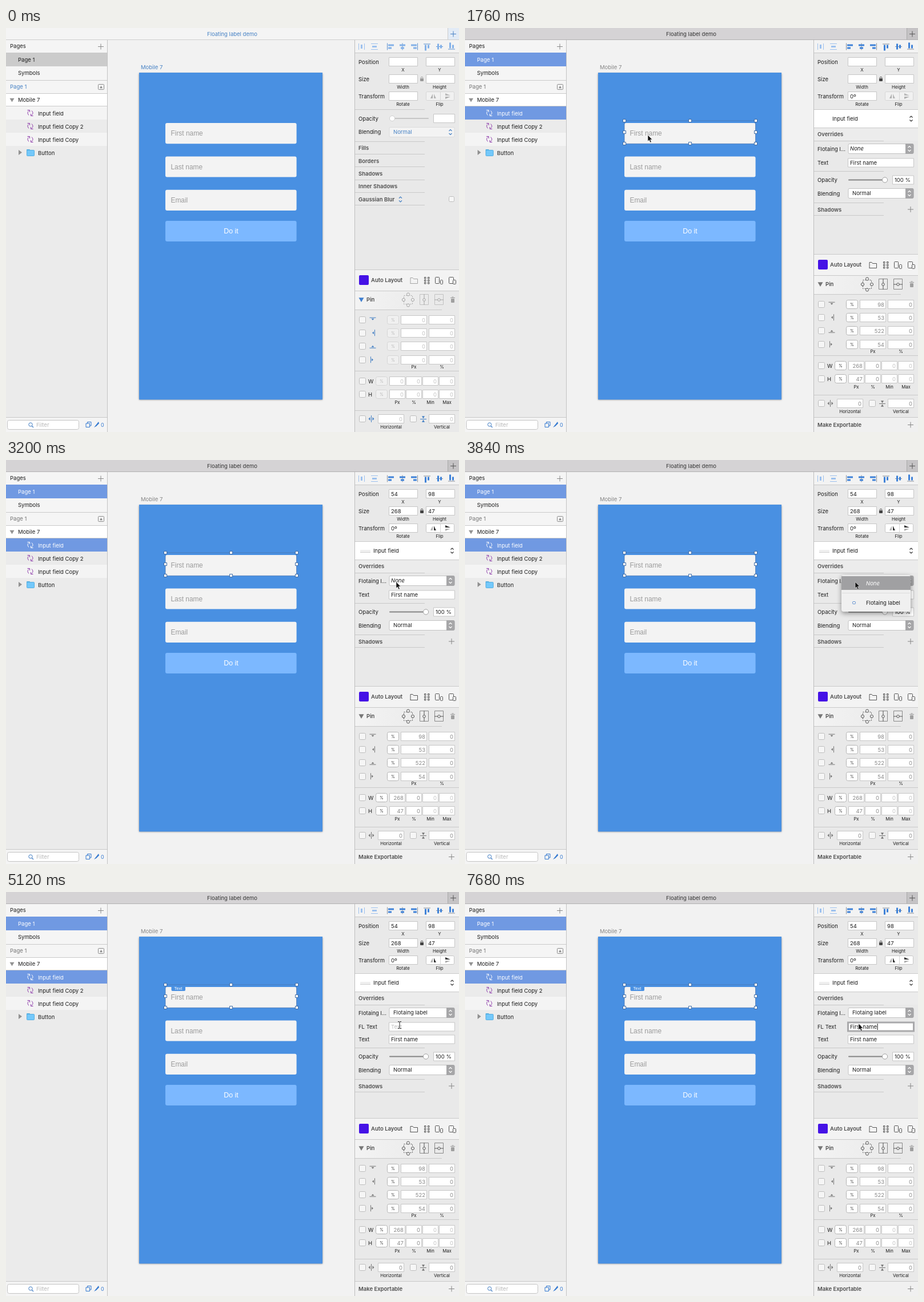
An HTML page with a canvas for the animation above (8000 ms loop, 793x706 px).

```html
<!DOCTYPE html>
<html lang="en">
<head>
<meta charset="utf-8">
<title>Floating label demo</title>
<style>
html, body { margin: 0; width: 100%; height: 100%; overflow: hidden; background: #f2f2f2; }
canvas { display: block; width: 793px; height: 706px; }
</style>
</head>
<body>
<canvas id="stage" width="793" height="706"></canvas>
<script>
const c = document.getElementById('stage').getContext('2d');
const LOOP = 8000, STEP = 160;
const UI = 'Inter, "Open Sans", sans-serif', ART = '"Liberation Sans", sans-serif';
const BLUE = '#4990e2', LINK = '#4580c4', INK = '#1d1d1d', HEAD = '#4c4c4c', LINE = '#c9c9c9';

function box(x, y, w, h, fill) { c.fillStyle = fill; c.fillRect(x, y, w, h); }
function round(x, y, w, h, r, fill, stroke) {
  c.beginPath();
  c.roundRect(x, y, w, h, r);
  if (fill) { c.fillStyle = fill; c.fill(); }
  if (stroke) { c.strokeStyle = stroke; c.lineWidth = 1; c.stroke(); }
}
function path(points, { fill, stroke, width = 1 }) {
  c.beginPath();
  points.forEach(([x, y], i) => i ? c.lineTo(x, y) : c.moveTo(x, y));
  if (fill) { c.closePath(); c.fillStyle = fill; c.fill(); }
  if (stroke) { c.strokeStyle = stroke; c.lineWidth = width; c.stroke(); }
}
function ring(x, y, r, stroke, fill, from = 0, to = 7) {
  c.beginPath();
  c.arc(x, y, r, from, to);
  if (fill) { c.fillStyle = fill; c.fill(); }
  c.strokeStyle = stroke; c.lineWidth = 1; c.stroke();
}
function text(s, x, y, { size = 9.5, color = INK, style = '', font = UI, align = 'left' } = {}) {
  c.font = `${style} ${size}px ${font}`;
  c.fillStyle = color;
  c.textAlign = align;
  c.fillText(s, x, y + size * .36);
}
const small = (s, x, y) => text(s, x, y, { size: 7.8, align: 'center' });
const head = (s, x, y, color = HEAD) => text(s, x, y, { style: '600', color });
const rule = (y, to = 793, x = 611) => box(x, y, to - x, 1, LINE);

function field(x, y, w, value = '', color = INK, right) {
  round(x + .5, y - 7.5, w - 1, 15, 0, '#fff', '#c6c6c6');
  text(value, right ? x + w - 3 : x + 4, y + .5, { color, align: right ? 'right' : 'left' });
}
const check = (x, y) => round(x + .5, y - 5.5, 11, 11, 2, '#f6f6f6', '#bdbdbd');
function plus(x, y, color, r = 5) {
  box(x - r, y - .5, 2 * r, 1, color);
  box(x - .5, y - r, 1, 2 * r, color);
}
function chevrons(x, y, color) {
  for (const d of [-1, 1])
    path([[x - 2.5, y + 2 * d], [x, y + 4.5 * d], [x + 2.5, y + 2 * d]], { stroke: color, width: 1.2 });
}
function popup(y, value, active, style = '') {
  round(671, y - 8, 114, 17, 2, active ? '#fff' : '#f3f3f3', active ? '#c2c2c2' : '#dcdcdc');
  if (active) round(771, y - 8.5, 14.5, 18, [0, 3, 3, 0], '#a6a6a8');
  chevrons(778, y + .5, active ? '#fff' : LINK);
  text(value, style ? 674 : 678, y + .5, { color: active ? INK : LINK, style });
}
function down(x, y, color, r = 4) { path([[x - r, y - r * .7], [x + r, y - r * .7], [x, y + r]], { fill: color }); }

function swirl(x, y, color) {
  ring(x, y, 4.5, color, null, 2.1, 4.2);
  ring(x, y, 4.5, color, null, -1.05, 1.1);
  path([[x - 5, y - 5], [x - 1, y - 5], [x - 1, y - 1.5]], { stroke: color });
  path([[x + 5, y + 5], [x + 1, y + 5], [x + 1, y + 1.5]], { stroke: color });
}

function sidebar(sel) {
  box(0, 21, 178, 685, '#ebebeb');
  box(0, 21, 178, 22, '#f5f5f5');
  text('Pages', 7, 32);
  plus(166, 32.5, '#8a8a8a');
  box(0, 43, 178, 24, sel ? '#7099e2' : '#cbcbcb');
  text('Page 1', 21, 56, { color: sel ? '#fff' : INK });
  box(0, 67, 178, 24, '#f5f5f5');
  text('Symbols', 21, 79);
  box(0, 92, 178, 22, '#f5f5f5');
  text('Page 1', 7, 103, { color: sel ? '#757575' : LINK });
  round(161.5, 98.5, 10, 9, 1, null, '#8a8a8a');
  down(166.5, 103.5, '#8a8a8a', -2.5);
  box(0, 115, 178, 22, '#fff');
  down(10.5, 125.5, '#929292');
  text('Mobile 7', 21, 126);
  ['Input field', 'Input field Copy 2', 'Input field Copy'].forEach((s, i) => {
    const y = 149 + i * 23, on = sel && !i;
    box(0, y - 12, 178, 23, on ? '#7099e2' : i % 2 ? '#ebebeb' : '#f4f4f4');
    swirl(42.5, y - .5, on ? '#fff' : '#8e3cab');
    text(s, 56, y + .5, { color: on ? '#fff' : INK });
  });
  path([[22, 213], [28, 217.5], [22, 222]], { fill: '#929292' });
  round(36, 212, 6, 4, 1, '#55aee0');
  round(36.5, 213.5, 13, 10, 1, '#74c8fa', '#55aee0');
  text('Button', 56, 218.5);
  for (const y of [91, 114, 136]) box(0, y, 178, 1, '#cacaca');
  box(0, 680, 178, 26, '#f4f4f4');
  box(0, 680, 178, 1, LINE);
  round(2.5, 685.5, 125, 16, 3, '#fff', '#c4c4c4');
  ring(43, 693, 3.2, LINK);
  path([[45.3, 695.5], [48, 698]], { stroke: LINK, width: 1.3 });
  text('Filter', 53, 694, { color: '#b8b8b8' });
  round(142.5, 688.5, 6.5, 6.5, 0, null, '#3278d0');
  round(140, 691, 6.5, 6.5, 0, '#f4f4f4', '#3278d0');
  path([[154, 698], [162, 688], [163, 691], [158, 696]], { fill: '#3278d0' });
  text('0', 166, 694, { size: 9, color: '#3278d0' });
  box(177, 21, 1, 685, '#c3c3c3');
}

function artboard(sel, label) {
  text('Mobile 7', 236, 69, { color: sel ? '#858585' : LINK });
  c.save();
  c.shadowColor = 'rgba(0,0,0,.45)';
  c.shadowBlur = 3;
  c.shadowOffsetY = 1;
  box(233, 78, 321, 571.4, BLUE);
  c.restore();
  ['First name', 'Last name', 'Email'].forEach((s, i) => {
    const y = 166 + i * 58.4;
    round(279, y, 229.6, 36.2, 3, '#f3f3f3');
    text(s, 288.5, y + 18.2, { size: 11.9, color: '#9b9b9b', font: ART });
  });
  round(279, 337, 229.6, 36, 3, '#7cb8ff');
  text('Do it', 394, 354.3, { size: 12.4, color: '#fff', font: ART, align: 'center' });
  if (label) {
    round(289.5, 163, 24.5, 10, 2, BLUE);
    text('Text', 301.5, 168.3, { size: 7.5, color: '#fff', font: ART, align: 'center' });
  }
  if (!sel) return;
  round(279, 162, 229.6, 40.3, 0, null, 'rgba(70,115,175,.75)');
  for (const x of [279, 394, 509])
    for (const y of [162, 182, 202])
      if (x !== 394 || y !== 182) round(x - 2.5, y - 2.5, 5, 5, 0, '#fff', '#3d6ba6');
}

function alignIcons(sel) {
  const pale = '#9dc1ee', on = sel ? '#3f82d8' : '#84b1e8', dim = sel ? '#8a9099' : '#5f92cf';
  box(617, 27, 1, 11, pale); box(621, 29, 3, 7, pale); box(627, 27, 1, 11, pale);
  box(639, 27, 12, 1, pale); box(641, 31, 8, 3, pale); box(639, 37, 12, 1, pale);
  [672, 694, 716, 737, 759, 780].forEach((x, i) => {
    c.save();
    c.translate(x, 32.5);
    const k = i % 3;
    if (i > 2) { c.rotate(Math.PI / 2); c.scale(1, -1); }
    box([-5, -.5, 4][k], -6, 1, 12, dim);
    box([-3, -5, -7][k], -4, 10, 3, on);
    box(-3, 1, 6, 3, on);
    c.restore();
  });
}

function slider(y, on) {
  const x = on ? 735 : 676;
  round(671, y - 1, 69, 2, 1, on ? '#858585' : '#c6c6c6');
  ring(x, y, 4.6, on ? '#a0a0a0' : '#d0d0d0', '#fff');
}

function inspector(s) {
  const { sel, ready } = s;
  box(611, 21, 182, 685, '#e9e9e9');
  box(611, 21, 182, 22, '#f3f3f3');
  rule(43);
  alignIcons(sel);
  const v = ready ? ['54', '98', '268', '47'] : ['', '', '', ''];
  [['Position', 'X', 'Y'], ['Size', 'Width', 'Height'], ['Transform', 'Rotate', 'Flip']].forEach(([name, a, b], i) => {
    const y = 59 + i * 30;
    text(name, 617, y + .5);
    field(670, y, 51, i < 2 ? v[i * 2] : sel ? '0º' : '');
    if (i < 2) field(735, y, 51, v[i * 2 + 1]);
    small(a, 695, y + 13.8);
    small(b, 759, y + 13.8);
  });
  const lock = sel ? '#444' : '#999';
  round(725, 88, 6, 5, 1, lock);
  ring(728, 87.5, 2, lock, null, Math.PI, 0);
  round(735.5, 111.5, 49, 15, 2, ready ? '#fff' : '#f1f1f1', ready ? '#c6c6c6' : '#d6d6d6');
  box(760, 112, 1, 14, '#d6d6d6');
  const flip = ready ? '#333' : '#b8b8b8';
  path([[743, 123], [747, 115], [747, 123]], { fill: '#b0b0b0' });
  path([[749, 115], [749, 123], [753, 123]], { fill: flip });
  path([[769, 114], [778, 118], [769, 118]], { fill: flip });
  path([[769, 120], [778, 120], [769, 124]], { fill: '#b0b0b0' });

  if (sel) details(s);
  else {
    rule(142, 733);
    text('Opacity', 617, 158.5);
    slider(158, false);
    field(748, 158, 38);
    text('Blending', 617, 182);
    popup(181.5, 'Normal', false);
    ['Fills', 'Borders', 'Shadows', 'Inner Shadows', 'Gaussian Blur'].forEach((name, i) => {
      rule(198 + Math.round(i * 22.2), 733);
      head(name, 617, 210 + i * 22.3);
    });
    rule(309, 733);
    chevrons(690.5, 299.5, LINK);
    round(775.5, 294.5, 9, 9, 2, '#f6f6f6', '#bdbdbd');
  }
  layout(sel);
  box(610, 21, 1, 685, '#bdbdbd');
}

function details({ ready, label, focus, typed }) {
  box(611, 143, 182, 31, '#fff');
  rule(142); rule(174);
  box(611, 175, 182, 22, '#ececec');
  rule(197, 733);
  if (ready) {
    round(620, 157, 18, 5, 1, '#efefef');
    box(620, 161, 18, 1, '#cfcfcf');
  }
  text('Input field', 643, 158.8);
  chevrons(781, 158.5, '#333');
  head('Overrides', 617, 186);
  text('Flotaing l...', 617, 211.5);
  popup(210.5, label ? 'Flotaing label' : 'None', true, label ? '' : 'italic');
  const k = label ? 22 : 0;
  text('Text', 617, 236 + k);
  if (label) {
    text('FL Text', 617, 236);
    field(670, 235.5, 116, typed || 'Text', typed ? INK : '#bdbdbd');
    if (focus) {
      c.strokeStyle = '#a9a9ab';
      c.lineWidth = 3;
      c.strokeRect(670.5, 228, 115, 15);
      c.font = '9.5px ' + UI;
      box(674.5 + c.measureText(typed).width, 230, 1, 11, '#111');
    }
  }
  field(670, 235.5 + k, 116, 'First name');
  rule(250 + k, 733);
  text('Opacity', 617, 266 + k);
  slider(265.5 + k, true);
  field(748, 265.5 + k, 38, '100 %');
  text('Blending', 617, 289.5 + k);
  popup(288.5 + k, 'Normal', true);
  rule(305 + k, 733);
  rule(327 + k, 733);
  head('Shadows', 617, 317.5 + k);
  plus(780, 317 + k, '#858585');
}

function layout(sel) {
  const tone = sel ? '#555' : '#a5a5a5', val = sel ? '#8a8a8a' : '#c2c2c2', mark = sel ? '#777' : LINK;
  c.save();
  if (sel) c.translate(0, -27);
  box(611, 422, 182, 37, '#f3f3f3');
  rule(422); rule(459);
  round(618, 432, 17, 17, 2, '#4512e6');
  head('Auto Layout', 639, 441);
  path([[708, 446.5], [708, 436.5], [712, 436.5], [713.5, 438.5], [720.5, 438.5], [720.5, 446.5], [707.5, 446.5]], { stroke: tone });
  for (const x of [732.5, 738.5]) for (const y of [435.5, 440, 444.5]) round(x, y, 2.5, 2.5, 0, null, '#555');
  for (const [x, w, sx] of [[751.5, 7, 760.5], [775.5, 8, 782.5]]) {
    round(x, 435.5, w, 11, 1, null, '#555');
    round(sx, 440.5, w === 7 ? 4 : 5, 7, 1, '#f3f3f3', '#555');
  }
  const shade = c.createLinearGradient(611, 0, 793, 0);
  shade.addColorStop(0, '#f3f3f3');
  shade.addColorStop(.85, '#e9e9e9');
  box(611, 460, 182, 32, shade);
  rule(492, 763);
  down(622, 474.5, sel ? '#777' : '#3f7fd0', 4.5);
  head('Pin', 631, 475);
  c.setLineDash([2, 2]);
  round(696.5, 467.5, 15, 15, 0, null, tone);
  c.setLineDash([]);
  for (const [dx, dy] of [[0, -9.5], [8, 0], [0, 9.5], [-8, 0]]) ring(704 + dx, 475 + dy, 2.6, tone, '#eee');
  for (const x of [724.5, 750.5]) round(x, 465.5, 15, 18, 0, null, sel ? '#888' : '#c2c2c2');
  path([[732, 465], [732, 484]], { stroke: tone });
  path([[750, 475], [766, 475]], { stroke: tone });
  for (const x of [732, 758]) ring(x, 475, 2.3, tone, '#eee');
  box(778, 471, 8, 1, '#999'); box(780.5, 469.5, 3, 1, '#999');
  round(779, 473, 6, 7, 1, '#a0a0a0');

  const percent = (x, y) => {
    round(x + .5, y - 7.5, 20, 15, 3, sel ? '#fff' : '#f0f0f0', sel ? '#b4b4b4' : '#d5d5d5');
    text('%', x + 10.5, y, { size: 7, color: sel ? '#333' : '#b5b5b5', align: 'center' });
  };
  [98, 53, 522, 54].forEach((n, i) => {
    const y = 509.7 + Math.round(i * 23.2), row = Math.round(y);
    check(618, row);
    c.save();
    c.translate(642, y);
    c.rotate(i * Math.PI / 2);
    box(-5.5, -4, 11, 1, mark);
    path([[-2.5, -2], [2.5, -2], [0, 1]], { fill: mark });
    c.restore();
    percent(667, row);
    field(691, row, 46, sel ? n : 0, val, true);
    field(740, row, 46, 0, val, true);
  });
  small('Px', 714, 592); small('%', 763, 592);
  rule(599);
  [['W', 268], ['H', 47]].forEach(([s, n], i) => {
    const y = 617 + i * 23;
    check(618, y);
    text(s, 634, y + .5);
    percent(647, y);
    for (let j = 0; j < 4; j++)
      field(671 + j * 29, y, 28, sel && !j ? n : 0, j > 1 ? '#c2c2c2' : val, true);
  });
  ['Px', '%', 'Min', 'Max'].forEach((s, i) => small(s, 685 + i * 29, 654));
  rule(668);
  check(618, 683);
  box(639, 677, 1, 12, mark);
  path([[637.5, 680], [637.5, 686], [634.5, 683]], { fill: mark });
  path([[641.5, 680], [641.5, 686], [644.5, 683]], { fill: mark });
  field(651, 683, 46, 0, val, true);
  check(707, 683);
  box(725, 683, 11, 1, mark);
  down(730.5, 680, mark, 2.5);
  down(730.5, 687, mark, -2.5);
  field(740, 683, 46, 0, val, true);
  small('Horizontal', 674, 697); small('Vertical', 763, 697);
  c.restore();
  if (sel) {
    box(611, 680, 182, 26, '#f0f0f0');
    rule(680);
    head('Make Exportable', 617, 693.5);
    plus(780, 693.5, '#858585');
  }
}

function titleBar(sel) {
  box(0, 0, 793, 20, sel ? '#d5d3d5' : '#f4f4f4');
  box(773, 0, 20, 20, sel ? '#c5c3c5' : '#e2ebf6');
  box(773, 0, 1, 20, sel ? '#aaa' : '#ccc');
  box(0, 20, 793, 1, sel ? '#b3b1b3' : '#cdcdcd');
  text('Floating label demo', 396, 10.5, { color: sel ? '#333' : LINK, align: 'center' });
  plus(783, 10.5, sel ? '#555' : LINK);
}

function menu(hover, alpha) {
  c.save();
  c.globalAlpha = alpha;
  c.shadowColor = 'rgba(0,0,0,.4)';
  c.shadowBlur = 9;
  c.shadowOffsetY = 3;
  round(659, 201, 121, 64, 4, '#f0f0f0');
  c.shadowColor = 'transparent';
  box(659, hover ? 238 : 203, 121, 24, '#a0a0a2');
  box(660, 232, 119, 1, '#dcdcdc');
  text('None', 702, 215.5, { style: 'italic', color: hover ? INK : '#fff' });
  round(678.5, 247.5, 5, 4, 1, null, '#5e8fd0');
  text('Flotaing label', 702, 250, { color: hover ? '#fff' : INK });
  c.restore();
}

function arrow(x, y) {
  path([[0, 0], [0, 11], [2.5, 8.8], [4.3, 13], [6.2, 12.2], [4.4, 8], [7.8, 8]].map(([a, b]) => [x + a, y + b]),
    { fill: '#111' });
  c.strokeStyle = 'rgba(255,255,255,.75)';
  c.lineWidth = .7;
  c.stroke();
}
function beam(x, y) {
  box(x - .5, y - 5, 1, 11, '#222');
  for (const d of [-6, 6]) {
    box(x - 3, y + d, 2.5, 1, '#222');
    box(x + .5, y + d, 2.5, 1, '#222');
  }
}

// Pointer stops: time, x, y
const STOPS = [[160, 345, 712], [1280, 322, 192], [1600, 320, 187], [2080, 320, 187], [3200, 683, 213],
  [4160, 683, 213], [4640, 686, 242], [4800, 686, 242], [5120, 689, 232], [7680, 689, 230]];
function pointer(t) {
  const i = STOPS.findIndex(s => s[0] >= t);
  if (i < 1) return STOPS[i < 0 ? STOPS.length - 1 : 0].slice(1);
  const [a, x, y] = STOPS[i - 1], [b, u, v] = STOPS[i];
  const p = (t - a) / (b - a), e = p * p * (3 - 2 * p);
  return [x + (u - x) * e, y + (v - y) * e];
}
function typedAt(t) {
  const n = t < 5920 ? 0 : t < 7040 ? Math.min(6, (t - 5920) / STEP + 1) : 7 + (t - 7040) / STEP;
  return 'First name'.slice(0, Math.min(10, n));
}

function draw(t) {
  const s = { sel: t >= 1760, ready: t >= 1920, label: t >= 4960, focus: t >= 5600, typed: typedAt(t) };
  box(0, 0, 793, 706, '#f2f2f2');
  titleBar(s.sel);
  sidebar(s.sel);
  artboard(s.sel, s.label);
  inspector(s);
  if (t >= 3520 && t < 4960) menu(t >= 4640, t < 4800 ? 1 : .93);
  const [x, y] = pointer(t);
  if (t >= 7680 || (t >= 320 && t < 5120)) arrow(x, y);
  else if (t >= 5120 && t < 5920) beam(689, 232);
}

let last = -1;
const start = performance.now();
function tick() {
  const t = Math.floor((performance.now() - start) % LOOP / STEP) * STEP;
  if (t !== last) draw(last = t);
  requestAnimationFrame(tick);
}
tick();
</script>
</body>
</html>
```
